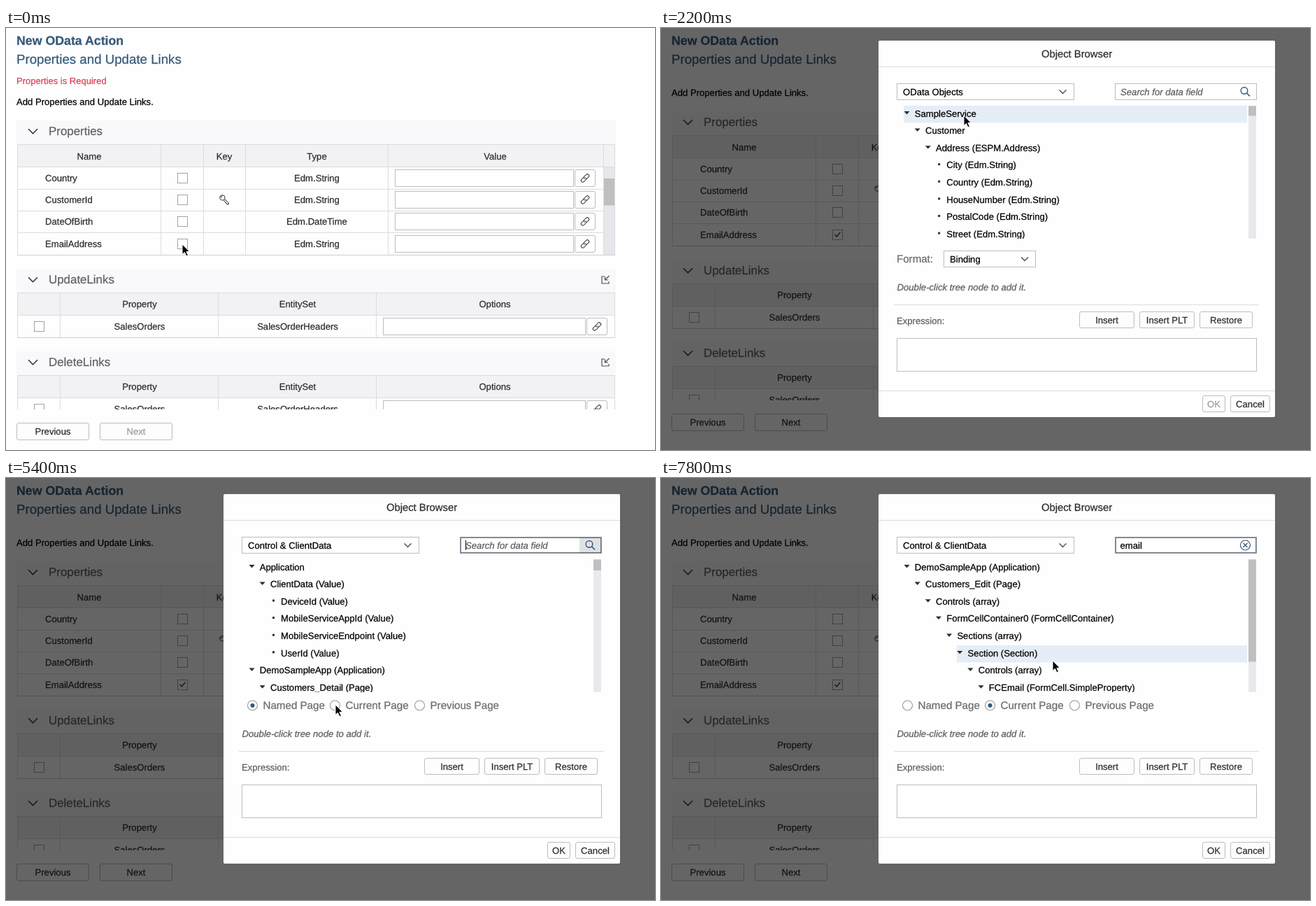
These frames come from a looping animation (928x603 px, 8000 ms). An HTML page:

```html
<!DOCTYPE html>
<html lang="en">
<head>
<meta charset="utf-8">
<title>Object Browser</title>
<style>
html, body { margin: 0; width: 100%; height: 100%; overflow: hidden; background: #fefefe; }
svg { display: block; width: 928px; height: 603px; font-family: "Liberation Sans", Arial, sans-serif; }
text { white-space: pre; text-rendering: geometricPrecision; stroke-width: .25px; }
</style>
</head>
<body>
<svg id="stage" viewBox="0 0 928 603" xmlns="http://www.w3.org/2000/svg"></svg>
<script>
const LOOP = 8000, STEP = 200;
const INK = '#2b2e32', BLUE = '#36597a', LINE = '#dcdcdf', EDGE = '#bcbdc0', FOCUS = '#8496a8';

// ---------- drawing helpers ----------
const rect = (x, y, w, h, fill = 'none', stroke = 'none', more = '') =>
  `<rect x="${x}" y="${y}" width="${w}" height="${h}" fill="${fill}" stroke="${stroke}" ${more}/>`;
const path = (d, stroke, width = 1, fill = 'none', more = '') =>
  `<path d="${d}" stroke="${stroke}" stroke-width="${width}" fill="${fill}" ${more}/>`;
const text = (x, mid, label, { size = 13.1, fill = INK, anchor = 'start', more = '' } = {}) =>
  `<text x="${x}" y="${mid + size * 0.355}" font-size="${size}" fill="${fill}" stroke="${fill}" text-anchor="${anchor}" ${more}>${label.replace(/&/g, '&amp;')}</text>`;
const centered = (x, mid, label, opts = {}) => text(x, mid, label, { ...opts, anchor: 'middle' });
const group = (id, body, more = '') => `<g id="${id}" ${more}>${body}</g>`;
const box = (x, y, w, h, fill = '#fff', stroke = EDGE, more = '') =>
  rect(x + .5, y + .5, w - 1, h - 1, fill, stroke, more);
const button = (x, y, w, h, label, opts) =>
  box(x, y, w, h, '#fdfdfd', EDGE, 'rx="2.5"') + centered(x + w / 2, y + h / 2, label, opts);
const hline = (y, x1, x2, color = LINE) => path(`M${x1} ${y + .5}H${x2}`, color);
const vline = (x, y1, y2, color = LINE) => path(`M${x + .5} ${y1}V${y2}`, color);
const chevron = (x, y, w, h, color, width) =>
  path(`M${x - w} ${y - h / 2}L${x} ${y + h / 2}L${x + w} ${y - h / 2}`, color, width);
const checkbox = (x, y) => box(x - 7.5, y - 7.5, 15, 15, '#fff', '#a0a2a5');
const dotted = (x, y, w, h, color = '#000') =>
  rect(x + .5, y + .5, w - 1, h - 1, 'none', color, 'stroke-dasharray="1 1"');

const link = (x, y, color = '#45494d') =>
  `<g transform="translate(${x} ${y}) rotate(-45)" fill="none" stroke="${color}" stroke-width="1.1">
    <path d="M0 -2.4H-4.6a2.4 2.4 0 0 0 0 4.8H-1.2a2.4 2.4 0 0 0 2.2 -2.8"/>
    <path d="M0 2.4H4.6a2.4 2.4 0 0 0 0 -4.8H1.2a2.4 2.4 0 0 0 -2.2 2.8"/></g>`;
const linkedInput = (x, mid, w) =>
  box(x, mid - 12.5, w, 25) + box(x + w + 1, mid - 12.5, 30, 25, '#fdfdfd', EDGE, 'rx="2.5"') +
  link(x + w + 16, mid);
const keyIcon = (x, y) =>
  `<circle cx="${x - 2.6}" cy="${y - 2.6}" r="3.6" fill="none" stroke="#4a4d50" stroke-width="1.2"/>
   <circle cx="${x - 3.8}" cy="${y - 3.8}" r="1" fill="#4a4d50"/>` +
  path(`M${x + .4} ${y - .6}L${x + 6.4} ${y + 5.2}v1.4h-2.4L${x - 1} ${y + 1}`, '#4a4d50', 1.1);
const importIcon = (x, y) =>
  path(`M${x - 1} ${y - 4.5}h-4v10h10v-3M${x + 5.5} ${y - 5.5}L${x} ${y}M${x - .5} ${y - 4}v4.5h4.5`, '#4a5055', 1.2);

// ---------- page ----------
function sectionHead(y, title, icon) {
  return rect(15, y, 857, 34, '#f9f9fb') + chevron(38.5, y + 15.5, 6.5, 6.5, '#2c4558', 1.7) +
    text(61, y + 15.5, title, { size: 16.9, fill: '#5f6265' }) + (icon ? importIcon(857, y + 15.5) : '');
}

function propertiesTable() {
  const rows = [['Country', 'String'], ['CustomerId', 'String'], ['DateOfBirth', 'DateTime'], ['EmailAddress', 'String']];
  let out = sectionHead(132, 'Properties') + rect(16, 166, 855, 33, '#f2f2f4') +
    group('rowHover', rect(16, 293, 838, 31, '#f3f3f5'));
  [[119, 'Name'], [312, 'Key'], [444.5, 'Type'], [699.5, 'Value']].forEach(([x, s]) => out += centered(x, 183, s));
  rows.forEach(([name, type], i) => {
    const mid = Math.round(202 + i * 31.2) + 12.5;
    out += text(56, mid, name) + checkbox(252.5, mid) + centered(444.5, mid, 'Edm.' + type) +
      linkedInput(556, mid, 256) + hline(mid + 15.5, 16, 854);
  });
  out += rect(855, 199, 16, 125, '#e7e7eb') + rect(855, 215, 16, 38.5, '#bfbfc2') + keyIcon(312, 245);
  [16, 221, 282, 342, 546, 854, 870].forEach(x => out += vline(x, 166, 325));
  out += hline(166, 16, 871) + hline(198, 16, 871) + hline(324, 16, 871, '#cfcfd2');
  out += group('tick', path('M248.5 308l2.8 3 5-6.2', BLUE, 1.6));
  return out + group('pressed', rect(813, 296, 30, 25, '#46688a', 'none', 'rx="2"') +
    dotted(814, 297, 28, 23, '#fff') + link(828, 308.5, '#fff'));
}

function linksTable(y, title) {
  let out = sectionHead(y, title, true) + rect(16, y + 34, 855, 32, '#f2f2f4');
  [[191, 'Property'], [417, 'EntitySet'], [699, 'Options']].forEach(([x, s]) => out += centered(x, y + 50.5, s));
  const mid = y + 82.5;
  out += checkbox(47.5, mid) + centered(191, mid, 'SalesOrders') + centered(417, mid, 'SalesOrderHeaders') +
    linkedInput(539, mid, 290);
  [16, 77, 303, 529, 870].forEach(x => out += vline(x, y + 34, y + 98));
  return out + hline(y + 34, 16, 871) + hline(y + 66, 16, 871) + hline(y + 98, 16, 871, '#cfcfd2');
}

const page = rect(0, 0, 928, 603, '#fefefe') +
  text(15, 17.5, 'New OData Action', { size: 17.75, fill: BLUE, more: 'font-weight="bold"' }) +
  text(15, 44.5, 'Properties and Update Links', { size: 18.7, fill: BLUE }) +
  group('error', text(15, 75, 'Properties is Required', { size: 13, fill: '#d6455a' })) +
  group('form',
    text(15, 105, 'Add Properties and Update Links.', { fill: '#000' }) +
    `<g clip-path="url(#formClip)">${propertiesTable()}${linksTable(344, 'UpdateLinks')}${linksTable(462, 'DeleteLinks')}</g>` +
    button(15, 564, 104, 25, 'Previous') +
    group('nextOff', button(134, 564, 104, 25, 'Next', { fill: '#9b9da0' })) +
    group('nextOn', button(134, 564, 104, 25, 'Next')));

// ---------- dialog ----------
const treeX = level => 351.5 + level * 15.15;
function tree(id, nodes, hoverRow) {
  const rows = nodes.map(([level, label, leaf], i) => {
    const x = treeX(level), mid = 122 + i * 24.6;
    const mark = leaf ? rect(x - .8, mid - 2.6, 3, 3, INK) : `<path d="M${x - 4} ${mid - 3}h8l-4 4.5z" fill="${INK}"/>`;
    return (i === hoverRow ? group(id + 'Hover', rect(x - 4.5, mid - 11, 838 - x + 4.5, 24.5, '#e5edf6')) : '') +
      mark + text(x + 11.3, mid, label, { fill: '#000' });
  });
  return group(id, `<g clip-path="url(#treeClip)">${rows.join('')}</g>`);
}
const edm = name => [3, `${name} (Edm.String)`, true];
const trees = tree('objectTree', [
    [0, 'SampleService'], [1, 'Customer'], [2, 'Address (ESPM.Address)'],
    ...['City', 'Country', 'HouseNumber', 'PostalCode', 'Street'].map(edm)], 0) +
  tree('clientTree', [
    [0, 'Application'], [1, 'ClientData (Value)'],
    ...['DeviceId', 'MobileServiceAppId', 'MobileServiceEndpoint', 'UserId'].map(s => [2, s + ' (Value)', true]),
    [0, 'DemoSampleApp (Application)'], [1, 'Customers_Detail (Page)']]) +
  tree('foundTree', ['DemoSampleApp (Application)', 'Customers_Edit (Page)', 'Controls (array)',
    'FormCellContainer0 (FormCellContainer)', 'Sections (array)', 'Section (Section)', 'Controls (array)',
    'FCEmail (FormCell.SimpleProperty)'].map((s, i) => [i, s]), 5);

const italic = { size: 13.15, fill: '#5c5f62', more: 'font-style="italic"' };
const options = ['OData Functions Result', 'OData Objects', 'Control & ClientData', 'Rules', 'Global Data',
  'Array Initialization', 'i18n Objects'];
const menu = group('menu', rect(337.5, 103.5, 253, 241, '#fff', '#d4d5d8') +
  group('optionHover', rect(338, 173, 252, 34, '#f1f1f3')) + rect(338, 139, 252, 34, '#1a666c') +
  options.map((s, i) => text(344, 122 + i * 34, s, { fill: i === 1 ? '#fff' : INK })).join(''));

const lens = `<circle cx="834" cy="89.5" r="4.8" fill="none" stroke="${BLUE}" stroke-width="1.4"/>` +
  path('M837.5 93l4.5 4.5', BLUE, 1.7);
const search = box(649, 79, 203, 24) +
  group('searchActive', rect(820, 80, 31, 22, '#e0e1e4') + box(649, 79, 203, 24, 'none', '#5b7b9a')) +
  group('hintText', lens + text(657, 91, 'Search for data field', italic)) +
  group('typed', text(656.5, 91, '', { fill: '#000', more: 'id="query"' }) +
    `<circle cx="835.5" cy="91" r="7" fill="none" stroke="${BLUE}" stroke-width="1.2"/>` +
    path('M832.5 88l6 6m0-6l-6 6', BLUE, 1.3)) +
  group('searchFocus', box(649, 79, 203, 24, 'none', FOCUS) + dotted(650, 80, 201, 22)) +
  group('caret', vline(0, 84, 98, '#000'));

const select = box(337, 79, 254, 24) + chevron(574.5, 91, 5, 5, '#45494d', 1.3) +
  group('selectFocus', rect(345, 84, 86, 14, '#d3e4f2', 'none', 'id="selection"') +
    box(337, 79, 254, 24, 'none', FOCUS) + dotted(338, 80, 252, 22)) +
  text(346, 91, '', { fill: '#000', more: 'id="selected"' });

const scrollbar = rect(840, 111, 11, 190, '#e9e9ed') +
  `<rect id="thumb" x="840" y="111.5" width="11" height="14" fill="#bfbfc2"/>`;
const radios = [[352.5, 'Named'], [470.5, 'Current'], [591.5, 'Previous']].map(([x, s]) =>
  `<circle cx="${x}" cy="325" r="7" fill="#fff" stroke="#96989b" stroke-width="1.1"/>` +
  text(x + 15, 325, s + ' Page', { size: 15.15, fill: '#6a6d70' })).join('') +
  `<circle id="radioDot" cy="325" r="3" fill="${BLUE}"/>` + group('radioFocus', dotted(461, 314, 116, 21));

const dialog = group('dialog',
  group('panel', '') +
  group('upper', centered(594.5, 36.5, 'Object Browser', { size: 14.8 }) + hline(55, 311, 878) +
    search + trees + scrollbar + select) +
  group('format', text(337, 330, 'Format:', { size: 15.1, fill: '#6a6d70' }) + box(404, 318, 132, 24) +
    text(413, 330, 'Binding', { fill: '#000' }) + chevron(520, 330, 5, 5, '#45494d', 1.3)) +
  group('radios', radios) +
  group('lower', text(337.5, 370, 'Double-click tree node to add it.', italic) + hline(395, 333, 855) +
    text(337, 418, 'Expression:', { fill: '#5c5f62' }) +
    button(598, 405, 79, 24, 'Insert') + button(684, 405, 79, 24, 'Insert PLT') + button(770, 405, 76, 24, 'Restore') +
    box(337, 443, 515, 48) + hline(518, 311, 878) +
    group('okOff', button(774, 525, 33, 24, 'OK', { fill: '#9b9da0' })) +
    group('okOn', button(774, 525, 33, 24, 'OK')) + button(814, 525, 57, 24, 'Cancel')) +
  menu);

const pointers =
  group('arrow', path('M0 0V14.5L3.4 11.4L6 17L8.4 16L5.9 10.5H10.3Z', '#fff', 1, '#000')) +
  group('beam', path('M-3 -7.5q3 0 3 2.5V5q0 2.5 -3 2.5M3 -7.5q-3 0 -3 2.5M0 5q0 2.5 3 2.5M-2 2h4', '#222', 1.2));

document.getElementById('stage').innerHTML =
  `<defs><clipPath id="formClip"><rect width="928" height="545"/></clipPath>
   <clipPath id="treeClip"><rect x="337" y="111" width="503" height="190"/></clipPath></defs>` +
  page + group('shade', rect(0, 0, 928, 603, '#000', 'none', 'opacity=".6"')) + dialog + pointers;

// ---------- motion ----------
// time, x, y of the pointer
const route = [
  [0, 252, 309], [400, 252, 309], [1200, 827, 294], [1600, 827, 294], [2000, 547, 124], [2200, 433, 125],
  [2600, 573, 90], [3000, 573, 90], [3600, 496, 188], [3800, 496, 188], [4400, 694, 97], [4800, 694, 97],
  [5400, 471, 324], [5800, 471, 324], [6200, 715, 104], [7400, 715, 104], [7800, 560, 261], [8000, 560, 261]
];
const ease = p => p * p * (3 - 2 * p);
function pointerAt(t) {
  const i = route.findIndex((p, k) => k + 1 === route.length - 1 || t < route[k + 1][0]);
  const [t0, x0, y0] = route[i], [t1, x1, y1] = route[i + 1];
  const p = ease((t - t0) / (t1 - t0));
  return [x0 + (x1 - x0) * p, y0 + (y1 - y0) * p];
}

const $ = id => document.getElementById(id);
const show = (id, on) => $(id).style.display = on ? '' : 'none';
const move = (id, x, y) => $(id).setAttribute('transform', `translate(${x} ${y})`);
const setAll = (id, attrs) => Object.entries(attrs).forEach(([k, v]) => $(id).setAttribute(k, v));

function render(t) {
  const during = (a, b = LOOP) => t >= a && t < b;
  const [x, y] = pointerAt(t);
  const checked = during(400), open = during(2200), client = during(4000), found = during(7400);
  const query = 'email'.slice(0, Math.max(0, Math.min(5, Math.floor((t - 6400) / 160))));
  const focused = during(4400, 5600) || during(6400);

  show('error', !checked);
  show('tick', checked);
  show('nextOn', checked);
  show('nextOff', !checked);
  show('rowHover', during(400, 2200));
  show('pressed', during(1600, 2200));
  move('form', 0, checked ? -13 : 0);

  show('shade', open);
  show('dialog', open);
  const shift = client ? 5 : 0;
  move('upper', 0, shift);
  move('lower', 0, -shift);
  $('panel').innerHTML = rect(311, 18 + shift, 567, 538 - 2 * shift, '#fefefe', 'none', 'rx="2"');
  show('okOff', t < 2400);
  show('okOn', t >= 2400);
  show('format', !client);
  show('radios', client);
  show('menu', during(2800, 4000));
  show('optionHover', y > 173 && y < 207);
  show('selectFocus', during(2800, 4400));
  setAll('selection', { width: client ? 121 : 86 });
  $('selected').textContent = options[client ? 2 : 1];

  show('objectTree', !client);
  show('objectTreeHover', during(2200, 2400));
  show('clientTree', client && !found);
  show('foundTree', found);
  show('foundTreeHover', during(7800));
  setAll('thumb', { height: found ? 146 : client ? 15.5 : 14 });

  show('hintText', !query);
  show('typed', query);
  $('query').textContent = query;
  show('searchActive', !query && (focused || during(6200, 6400)));
  show('searchFocus', focused);
  const blinkStart = t < 6400 ? 4400 : 7200;
  show('caret', focused && (during(6400, 7200) || (t - blinkStart) % 1000 < 500));
  move('caret', 657 + (query ? $('query').getComputedTextLength() : 0), 0);

  setAll('radioDot', { cx: t < 5600 ? 352.5 : 470.5 });
  show('radioFocus', during(5600, 6400));

  const beam = during(4400, 5000) || during(6200, 6600);
  show('beam', beam);
  show('arrow', !beam && !during(6600, 7400));
  move('arrow', x, y);
  move('beam', x, y);
}

const start = performance.now();
let last = -1;
function tick(now) {
  const t = Math.floor((Math.max(0, now - start) % LOOP) / STEP) * STEP;
  if (t !== last) render(last = t);
  requestAnimationFrame(tick);
}
render(0);
requestAnimationFrame(tick);
</script>
</body>
</html>
```
